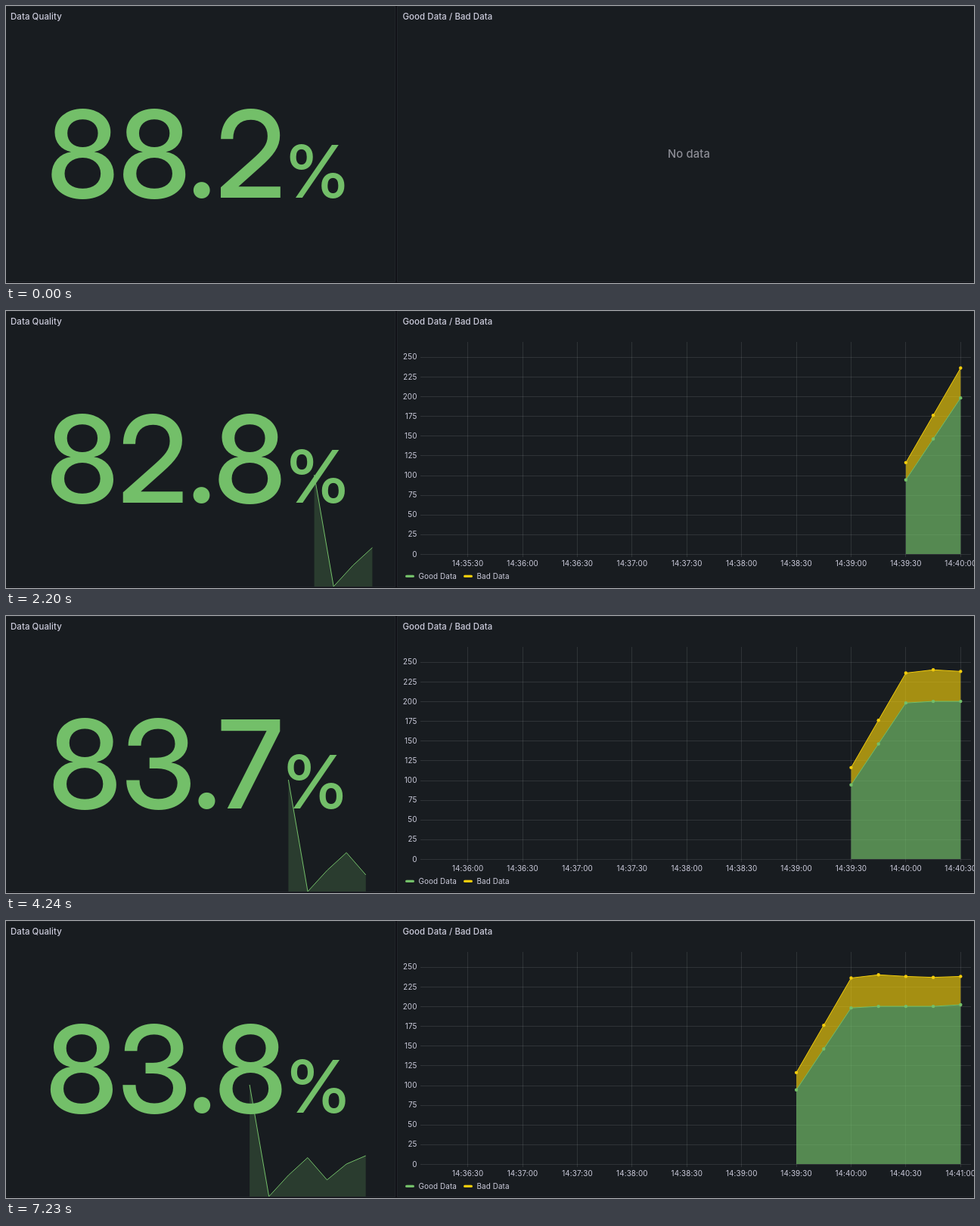
Write an HTML page that moves like this. It is 1280 px wide and 367 px high and loops after 8000 ms.

```html
<!DOCTYPE html>
<html lang="en">
<head>
<meta charset="utf-8">
<title>Data quality dashboard</title>
<style>
html, body { margin: 0; width: 100%; height: 100%; overflow: hidden; background: #111217; }
svg { display: block; width: 1280px; height: 367px; font: 9.9px Inter, sans-serif; letter-spacing: .01em; fill: #ccccdc; }
.panel { fill: #181c20; stroke: #202429; }
.title { font-size: 11.4px; font-weight: 500; }
.value { font-family: "Inter Display", Inter, sans-serif; font-weight: 500; letter-spacing: 0; fill: #73bf69; }
.empty { font-size: 14.8px; font-weight: 500; fill: #8c8d95; }
.grid { stroke: #f0faff; stroke-opacity: .1; fill: none; }
.mid { text-anchor: middle; }
.end { text-anchor: end; }
</style>
</head>
<body>
<svg viewBox="0 0 1280 367">
  <rect class="panel" x="-1.5" y=".5" width="516" height="365"/>
  <rect class="panel" x="517.5" y=".5" width="764" height="365"/>
  <text class="title" x="6" y="18">Data Quality</text>
  <text class="title" x="524.5" y="18">Good Data / Bad Data</text>
  <g id="stat"></g>
  <g id="chart"></g>
</svg>
<script>
const GREEN = '#73bf69', YELLOW = '#f2cc0c';
const LOOP = 8000;
const statTimes = [0, 190, 1210, 2200, 3210, 4220, 5230, 6230, 7230];
const chartTimes = [0, 210, 1230, 2220, 3230, 4240, 5230, 6230, 7230];

// Shown percentage and its font size after each refresh
const readings = [
  ['88.2', 160], ['83.1', 174], ['84.1', 172], ['82.8', 160], ['82.8', 160],
  ['83.7', 162], ['84.2', 159.5], ['84.2', 159.5], ['83.8', 160]
];
const sparkY = [217, 365, 337, 313.5, 343, 322, 311];
const good = [94, 146, 198, 200, 200, 200, 202];
const total = [116, 176, 236, 240, 238, 236.7, 238];

const join = pts => pts.map(p => p.map(v => v.toFixed(1)).join()).join(' ');
const line = (pts, color) => `<polyline points="${join(pts)}" fill="none" stroke="${color}"/>`;
const area = (pts, color, alpha) => `<polygon points="${join(pts)}" fill="${color}" fill-opacity="${alpha}"/>`;
const dots = (pts, color) => pts.map(([x, y]) => `<circle cx="${x}" cy="${y}" r="2.2" fill="${color}"/>`).join('');
const text = (x, y, str, cls = '') => `<text x="${x}" y="${y}" class="${cls}">${str}</text>`;
// Closes a line down to a base level
const onBase = (pts, base) => [[pts[0][0], base], ...pts, [pts[pts.length - 1][0], base]];

function stat(step) {
  const [num, size] = readings[step];
  let out = '';
  if (step) {
    const pts = sparkY.map((y, i) => [441.8 + 25.6 * i - 17.1 * (step - 1), y]).filter(p => p[0] < 495);
    out = area(onBase(pts, 365), GREEN, .2) + line(pts, GREEN);
  }
  return out + `<text class="value mid" x="253.7" y="${196 + .364 * size}" font-size="${size}">` +
    `${num}<tspan font-size="${.6 * size}">%</tspan></text>`;
}

// Clock label, k half minutes from 14:39:30
function clock(k) {
  const s = 14 * 3600 + 39 * 60 + 30 + 30 * k;
  return [s / 3600, s / 60 % 60, s % 60].map(v => String(Math.floor(v)).padStart(2, '0')).join(':');
}

function chart(step) {
  if (!step) return text(903, 201, 'No data', 'empty mid');
  const first = step === 1;
  const top = first ? 200 : 269, tick = first ? 20 : 25;
  const x0 = 1214 - 24.13 * (step - 1);
  const toY = v => 322 - 281 * v / top;
  let grid = '', labels = '';
  for (let v = 0; v <= top; v += tick) {
    const y = toY(v);
    grid += `M548 ${Math.round(y) + .5}H1276`;
    labels += text(543.5, y + 3.6, v, 'end');
  }
  for (let k = -10; k < 5; k++) {
    const x = x0 + 72.4 * k;
    if (x < 549 || x > 1276) continue;
    grid += `M${Math.floor(x) + .5} 41V326`;
    labels += text(x, 337.8, clock(k), 'mid');
  }
  const series = vals => vals.map((v, i) => [x0 + 36.2 * i, toY(v)]).filter(p => p[0] < 1277);
  const low = series(good), high = series(total);
  return `<path class="grid" d="${grid}"/>` + labels +
    area([...high, ...low.slice().reverse()], YELLOW, .65) + line(high, YELLOW) +
    area(onBase(low, 322), GREEN, .67) + line(low, GREEN) +
    dots(high, YELLOW) + dots(low, GREEN) +
    key(528, GREEN, 'Good Data') + key(605, YELLOW, 'Bad Data');
}

const key = (x, color, name) =>
  `<rect x="${x}" y="349.7" width="12" height="3.4" rx="1.7" fill="${color}"/>` + text(x + 17.5, 355, name);

const shown = {};
function show(id, times, draw, t) {
  const step = times.filter(s => s <= t).length - 1;
  if (shown[id] === step) return;
  shown[id] = step;
  document.getElementById(id).innerHTML = draw(step);
}

function frame() {
  const t = performance.now() % LOOP;
  show('stat', statTimes, stat, t);
  show('chart', chartTimes, chart, t);
  requestAnimationFrame(frame);
}
frame();
</script>
</body>
</html>
```
